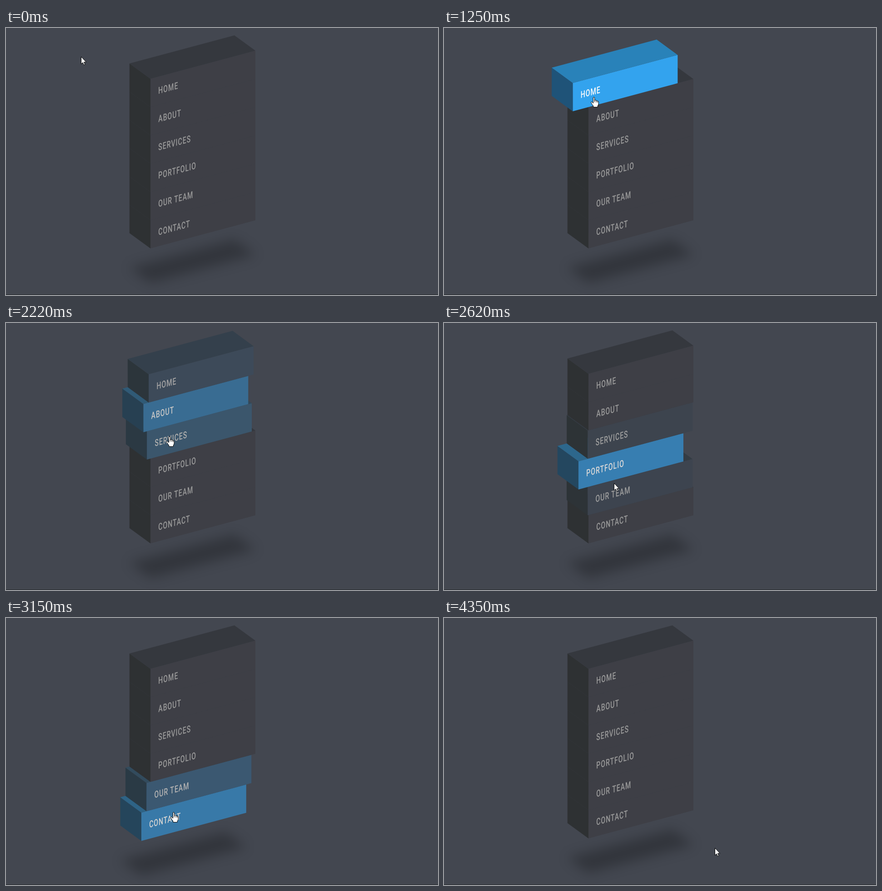
An HTML page for the animation above (4700 ms loop, 951x589 px).

```html
<!DOCTYPE html>
<html lang="en">
<head>
<meta charset="utf-8">
<title>Isometric menu</title>
<style>
html, body { margin: 0; width: 100%; height: 100%; overflow: hidden; background: #434750; }
body { position: relative; box-shadow: inset 0 -1px #25272b; }
ul {
  position: absolute; left: 317.7px; top: 111.8px; margin: 0; padding: 0; list-style: none;
  transform-origin: 0 0; transform: skewY(-15deg) scale(1.155);
}
li {
  --p: 0; --mix: calc(var(--p) * 100%);
  position: relative; box-sizing: border-box; width: 200px; height: 54px; padding-left: 15px;
  font: 500 18.2px/54px Roboto, sans-serif; letter-spacing: 1.3px;
  text-transform: uppercase; white-space: nowrap;
  color: color-mix(in srgb, #fffcfb var(--mix), #999);
  background: color-mix(in srgb, #33a3ee var(--mix), #3e3f46);
  transform: translateX(calc(var(--p) * -30px));
}
/* narrow cut of the face, the same for every label */
span { display: inline-block; transform-origin: 0 0; transform: scaleX(.67); }
li::before, li::after { content: ""; position: absolute; }
li::before {
  left: -40px; top: 0; width: 40px; height: 100%;
  transform-origin: right; transform: skewY(45deg);
  background: color-mix(in srgb, #1f5378 var(--mix), #2e3133);
}
li::after {
  left: 0; top: -40px; width: 100%; height: 40px;
  transform-origin: bottom; transform: skewX(45deg);
  background: color-mix(in srgb, #2982b9 var(--mix), #35383e);
}
li:last-child::after { box-shadow: -120px 120px 20px rgba(0, 0, 0, .25); }
svg { position: absolute; left: 0; top: 0; width: 30px; height: 30px; overflow: visible; z-index: 9; }
path { fill: #fff; stroke: #000; stroke-linejoin: round; }
</style>
</head>
<body>
<ul></ul>
<svg>
  <path id="arrow" d="M-.5 .5V16.5L3 13.2 5.5 18.5 7.9 17.5 5.5 12.2H10.5Z"/>
  <g id="hand">
    <path d="M-1.5 14V2Q-1.5 .5 0 .5T1.5 2V7.5Q4.5 6 5 8.3 7.5 7.3 8 9.3 10.2 9 10.2 11V15Q10 18 8.2 20V22.5H-1.2V20Q-4 17-6.3 12.5-6.5 10.8-4.8 10.8-3.5 11-1.5 14Z"/>
    <path d="M1.5 7V11.5M5 8.5V12M8 9.5V12.5" fill="none"/>
  </g>
</svg>
<script>
const LOOP = 4700, SPAN = 760, K = 1.155, NARROW = .67, SLOPE = Math.tan(Math.PI / 12);

// label, hover start, hover end (on the menu clock)
const menu = [
  ["Home", 515, 1764], ["About", 1764, 2092], ["Services", 2092, 2406],
  ["Portfolio", 2406, 2719], ["Our team", 2719, 3119], ["Contact", 3119, 3820]
];
// page time -> menu clock
const clock = [[0, 0], [2220, 2220], [2620, 2770], [3150, 3374], [3720, 4074], [3820, 4074], [4310, 4580], [LOOP, 4980]];
// time, x, y of the pointer tip
const route = [
  [220, 166, 63], [515, 272, 108], [770, 304, 124], [950, 330, 152], [1620, 330, 152], [1840, 339, 179],
  [2220, 360, 250], [2620, 375, 353], [3150, 369, 428], [3513, 470, 446], [3720, 586, 500],
  [3820, 586, 500], [4000, 597, 507]
];

const list = document.querySelector("ul");
const items = menu.map(([label, on, off], i) => {
  const li = document.createElement("li"), text = document.createElement("span");
  text.textContent = label;
  li.style.zIndex = menu.length - i;
  li.append(text);
  list.append(li);
  return { li, text, on, off, i };
});
const svg = document.querySelector("svg");
const arrow = document.getElementById("arrow"), hand = document.getElementById("hand");

const clamp = v => Math.min(1, Math.max(0, v));

function along(points, t) {
  const n = points.findIndex(p => p[0] > t);
  if (n < 0) return points.at(-1).slice(1);
  if (n === 0) return points[0].slice(1);
  const a = points[n - 1], b = points[n], f = (t - a[0]) / (b[0] - a[0]);
  return a.slice(1).map((v, k) => v + (b[k + 1] - v) * f);
}

// cubic-bezier(.25, .1, .25, 1)
function ease(x) {
  let lo = 0, hi = 1;
  for (let n = 0; n < 20; n++) {
    const s = (lo + hi) / 2;
    if (.75 * s * (1 - s) + s ** 3 < x) lo = s; else hi = s;
  }
  return .3 * lo * (1 - lo) ** 2 + 3 * lo * lo * (1 - lo) + lo ** 3;
}

// an interrupted hover returns in a proportionally shorter time
function hover(t, on, off) {
  const peak = ease(clamp((Math.min(t, off) - on) / SPAN));
  return t <= off ? peak : peak * (1 - ease(clamp((t - off) / (SPAN * peak))));
}

function overText({ text, i, p }, x, y) {
  const dx = x - 317.7, u = dx / K + 30 * p, v = (y - 111.8 + dx * SLOPE) / K - 54 * i;
  return u > 15 && u < 15 + text.offsetWidth * NARROW && v > 15 && v < 39;
}

function draw(now) {
  const t = now % LOOP, [m] = along(clock, t), [x, y] = along(route, t);
  for (const item of items) {
    item.p = hover(m, item.on, item.off);
    item.li.style.setProperty("--p", item.p.toFixed(4));
  }
  const link = items.some(item => overText(item, x, y));
  arrow.style.display = link ? "none" : "";
  hand.style.display = link ? "" : "none";
  svg.style.transform = `translate(${Math.round(x)}px, ${Math.round(y)}px)`;
}

const start = performance.now();
function tick() {
  draw(performance.now() - start);
  requestAnimationFrame(tick);
}
tick();
</script>
</body>
</html>
```
